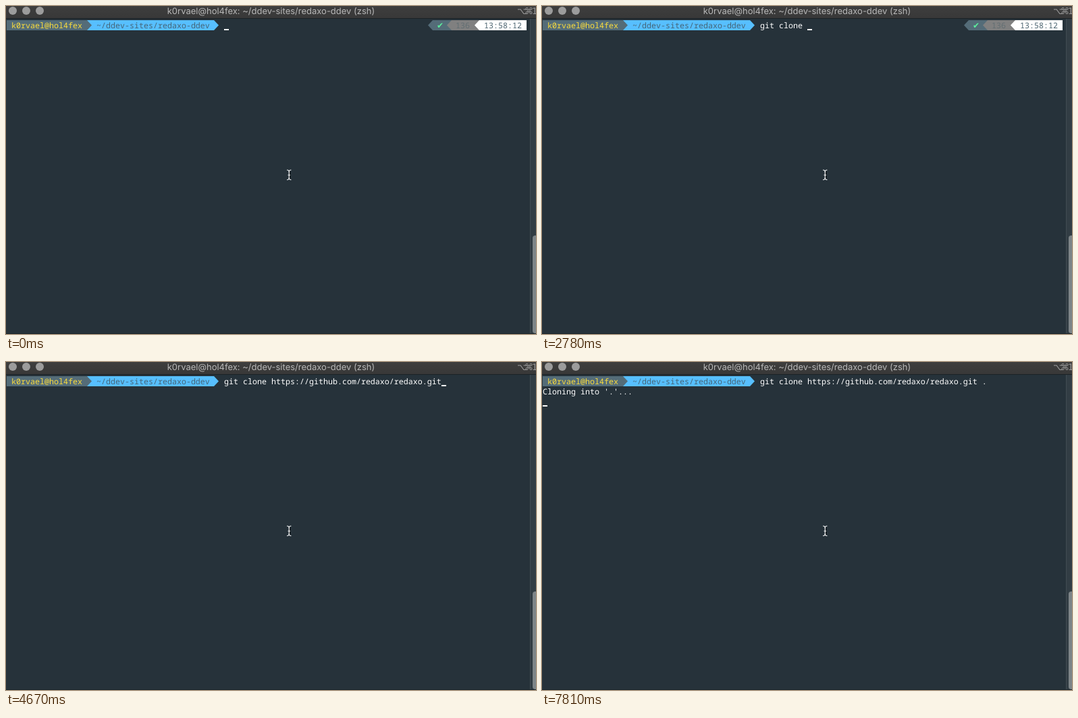
Animation, 785 px wide and 486 px high, one loop 8000 ms. Source, as an HTML page:

```html
<!DOCTYPE html>
<html lang="en">
<head>
<meta charset="utf-8">
<title>Terminal</title>
<style>
  html, body { margin: 0; width: 100%; height: 100%; overflow: hidden; background: #26323a; }
  svg { display: block; width: 785px; height: 486px; }
  text { white-space: pre; text-rendering: geometricPrecision; }
  .mono { font: 500 11.667px "Noto Sans Mono", "DejaVu Sans Mono", monospace; }
  .title { font: 13px Inter, "Liberation Sans", sans-serif; fill: #b8b8b8; }
  .keys { font: 13px "DejaVu Sans", sans-serif; fill: #999; }
</style>
</head>
<body>
<svg viewBox="0 0 785 486">
  <defs>
    <linearGradient id="bar" x2="0" y2="1">
      <stop stop-color="#3e3e3e"/>
      <stop offset="1" stop-color="#383838"/>
    </linearGradient>
  </defs>
  <rect width="785" height="486" fill="#26323a"/>

  <!-- title bar -->
  <rect width="785" height="18" fill="url(#bar)"/>
  <rect y="18" width="785" height="1" fill="#1b2226"/>
  <g fill="#9c9c9c">
    <circle cx="10" cy="7" r="6"/>
    <circle cx="30" cy="7" r="6"/>
    <circle cx="50" cy="7" r="6"/>
  </g>
  <text class="title" x="392.5" y="12" text-anchor="middle">k0rvael@hol4fex: ~/ddev-sites/redaxo-ddev (zsh)</text>
  <text class="keys" x="757 768 779" y="12">⌥⌘1</text>

  <!-- scrollbar -->
  <rect x="776" y="19" width="9" height="467" fill="#323d44"/>
  <rect x="776" y="19" width="1" height="467" fill="#414c52"/>
  <rect x="780" y="340" width="12" height="145" rx="4" fill="#7e8588"/>
  <rect y="485" width="785" height="1" fill="#1c262b"/>

  <!-- left prompt -->
  <path d="M120 21H308L315 28.5L308 36H120Z" fill="#57bfff"/>
  <path d="M1 21H120L127 28.5L120 36H1Z" fill="#546c78"/>
  <text class="mono" x="8" y="33" fill="#fbdd3c">k0rvael@hol4fex</text>
  <text class="mono" x="134" y="33" fill="#456676">~/ddev-sites/redaxo-ddev</text>

  <!-- right prompt -->
  <g id="status">
    <path d="M660 21H632L625 28.5L632 36H660Z" fill="#546c78"/>
    <path d="M701 21H660L653 28.5L660 36H701Z" fill="#808080"/>
    <path d="M771 21H701L694 28.5L701 36H771Z" fill="#fff"/>
    <text x="643" y="33" font-size="12" font-family="DejaVu Sans, sans-serif" text-anchor="middle" fill="#5cf19e">✔</text>
    <text class="mono" x="666" y="33" fill="#626e72">136</text>
    <text class="mono" x="708" y="33" fill="#4d6571">13:58:12</text>
  </g>

  <!-- command line -->
  <rect id="mark" x="393" y="21" width="252" height="15" fill="#f0f4f5"/>
  <g class="mono" fill="#fff">
    <text id="cmd" x="323" y="33"></text>
    <text id="arg" x="393" y="33"></text>
    <text id="out" x="1" y="48">Cloning into '.'...</text>
  </g>
  <rect id="cursor" width="7" height="2" fill="#fff"/>

  <!-- mouse pointer -->
  <g fill="none" stroke-linecap="round">
    <path d="M420.5 245V256" stroke="#0c1114" stroke-width="1.4"/>
    <path d="M416.5 243Q419.3 243 419.3 246Q419.3 243 422 243M419.3 246V254M416.5 257.5Q419.3 257.5 419.3 254Q419.3 257.5 422 257.5M418 250.5H420.5" stroke="#f4f6f7" stroke-width="1.2"/>
  </g>
</svg>
<script>
  const LOOP = 8000, CELL = 7, CMD_X = 323;
  const GIT = 'git clone ', URL_ARG = 'https://github.com/redaxo/redaxo.git';
  const PASTE = 3800, UNMARK = 4670, ENTER = 7810;
  const keyTimes = [1250, 1460, 1700, 1840, 2020, 2140, 2310, 2520, 2690, 2780];
  const tail = [[PASTE, ''], [5420, ' '], [5750, ' -'], [6370, ' '], [6550, ' .']];

  const $ = id => document.getElementById(id);
  const [status, mark, cmd, arg, out, cursor] =
    ['status', 'mark', 'cmd', 'arg', 'out', 'cursor'].map($);
  const show = (el, on) => el.setAttribute('visibility', on ? 'visible' : 'hidden');

  function render(t) {
    const typed = GIT.slice(0, keyTimes.filter(k => t >= k).length);
    const last = tail.filter(([k]) => t >= k).pop();
    const rest = last ? URL_ARG + last[1] : '';
    const marked = t >= PASTE && t < UNMARK;
    const entered = t >= ENTER;

    cmd.textContent = typed;
    arg.textContent = rest;
    arg.setAttribute('fill', marked ? '#26323a' : '#fff');
    show(mark, marked);
    show(status, t < PASTE);
    show(out, entered);
    cursor.setAttribute('x', entered ? 1 : CMD_X + CELL * (typed.length + rest.length));
    cursor.setAttribute('y', entered ? 64 : 34);
  }

  const start = performance.now();
  function tick() {
    render((performance.now() - start) % LOOP);
    requestAnimationFrame(tick);
  }
  tick();
</script>
</body>
</html>
```
